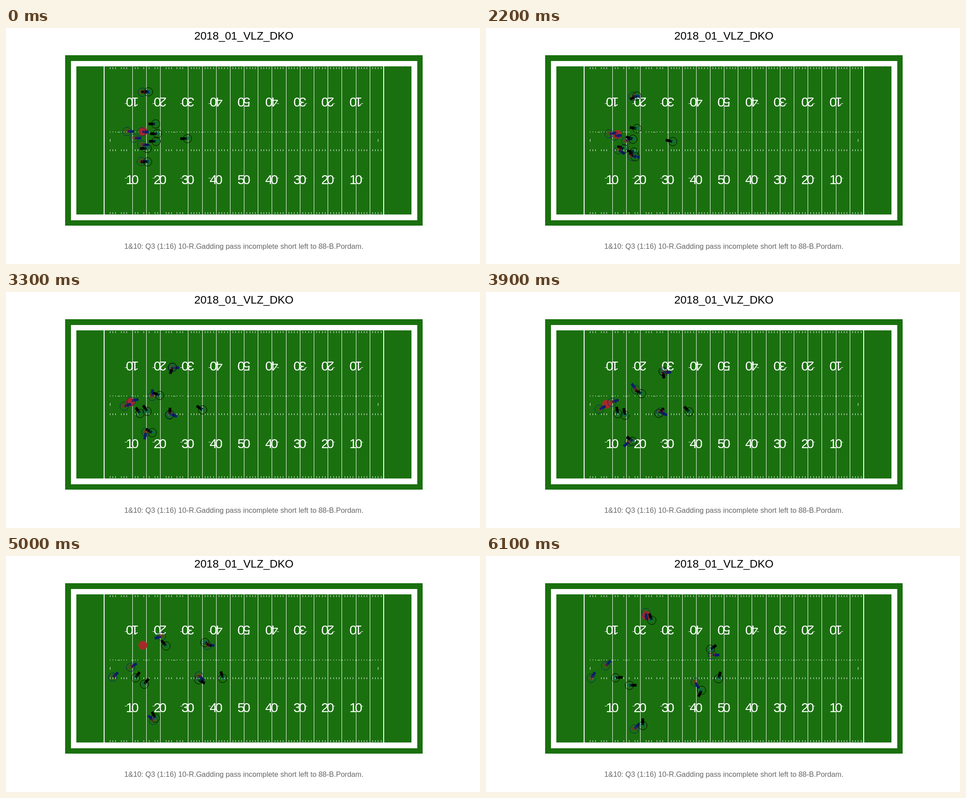
Recreate the animation shown at these times as an HTML page with a canvas. Size 1058x529 px, loop 6.2 s.

```html
<!DOCTYPE html>
<html lang="en">
<head>
<meta charset="utf-8">
<title>Play animation</title>
<style>
  html, body { margin: 0; width: 100%; height: 100%; overflow: hidden; background: #fff; }
  canvas { position: absolute; left: 0; top: 0; }
  p { position: absolute; left: 2px; width: 1058px; margin: 0; text-align: center;
      white-space: nowrap; font-family: "Liberation Sans", Arial, sans-serif; }
  .title { top: 2px; font-size: 24.6px; line-height: 31px; color: #000; }
  .note { top: 479px; font-size: 16.3px; line-height: 20px; color: #666; }
</style>
</head>
<body>
<canvas id="stage" width="1058" height="529"></canvas>
<p class="title">2018_01_VLZ_DKO</p>
<p class="note">1&amp;10: Q3 (1:16) 10-R.Gadding pass incomplete short left to 88-B.Pordam.</p>
<script>
const ctx = document.getElementById('stage').getContext('2d');
const FONT = '"Liberation Sans", Arial, sans-serif';
const GREEN = '#1a700e';
const LOOP = 6200, STEP = 100;
const SNAP = 1300, THROW = 4500, END = 6100;
const OFFENSE = { color: '#0b1f6b', text: '#a71930', facing: 0 };
const DEFENSE = { color: '#000', text: '#006778', facing: 180 };

// Each route runs from a start through a break to an end, turning to a final facing.
const players = [];
const player = (team, number, start, turn, end, facing) =>
  players.push({ team, number, start, turn, end, facing });

player(OFFENSE, '13', [304, 144], [407, 184], [505, 222], 0);
player(OFFENSE, '88', [303, 262], [337, 212], [357, 127], -275);
player(OFFENSE, '87', [302, 299], [398, 268], [467, 283], 60);
player(OFFENSE, '46', [286, 247], [322, 343], [331, 388], 312);
player(OFFENSE, '26', [270, 232], [281, 248], [267, 246], -45);
player(OFFENSE, '10', [303, 233], [249, 265], [235, 274], -58);

player(DEFENSE, '42', [334, 215], [349, 225], [370, 144], 250);
player(DEFENSE, '20', [318, 143], [404, 181], [501, 209], -35);
player(DEFENSE, '93', [315, 270], [293, 273], [289, 273], 355);
player(DEFENSE, '51', [338, 237], [309, 279], [320, 290], 358);
player(DEFENSE, '21', [316, 300], [394, 272], [481, 301], 475);
player(DEFENSE, '50', [335, 254], [327, 341], [350, 380], 270);
player(DEFENSE, '36', [405, 248], [459, 270], [519, 275], 285);

const ballPath = { start: [306, 232], release: [261, 256], end: [358, 134] };

// Yards to pixels, snapped to whole pixels.
const px = yard => Math.floor(219.85 + yard * 6.235);
const py = yard => Math.floor(418.6 - yard * 6.227);

const progress = (t, from, to) => Math.min(1, Math.max(0, (t - from) / (to - from)));
const mix = (a, b, u) => a + (b - a) * u;

// Parabola through start, turn and end.
const along = ({ start, turn, end }, u) => start.map((p, i) =>
  p * (1 - u) * (1 - 2 * u) + turn[i] * 4 * u * (1 - u) + end[i] * u * (2 * u - 1));

function ballAt(t) {
  const { start, release, end } = ballPath;
  const carry = progress(t, SNAP, THROW);
  const flight = 1 - (1 - progress(t, THROW, END)) ** 1.64;
  return start.map((p, i) => mix(mix(p, release[i], carry), end[i], flight));
}

function fieldRect(color, margin) {
  const x = px(-margin - 10), y = py(53.33 + margin);
  ctx.fillStyle = color;
  ctx.fillRect(x, y, px(110 + margin) - x, py(-margin) - y);
}

function circle(x, y, r) {
  ctx.beginPath();
  ctx.arc(x, y, r, 0, 2 * Math.PI);
}

function yardNumber(yard) {
  const x = px(yard), label = String(Math.min(yard, 100 - yard));
  ctx.font = '30px ' + FONT;
  ctx.textBaseline = 'alphabetic';
  for (const [y, turn] of [[339, 0], [166, Math.PI]]) {
    ctx.save();
    ctx.translate(x, y);
    ctx.rotate(turn);
    ctx.fillText(label[0], -6.2, 10.5);
    ctx.fillText(label[1], 6.2, 10.5);
    ctx.restore();
    const dash = yard < 50 ? x - 17 : x + 11;
    if (yard !== 50) ctx.fillRect(dash, turn ? 169 : 336, 5, 1);
  }
}

function drawField() {
  ctx.fillStyle = '#fff';
  ctx.fillRect(0, 0, 1058, 529);
  fieldRect(GREEN, 4);
  fieldRect('#fff', 2);
  fieldRect(GREEN, 0);

  ctx.fillStyle = '#fff';
  const top = py(53.33), height = py(0) - top;
  for (const goal of [0, 100]) ctx.fillRect(px(goal) - 1, top, 2, height);
  for (let yard = 1; yard < 100; yard++) {
    const x = px(yard);
    const hidden = yard % 4 === 1 && yard < 30;
    if (yard % 5 === 0) {
      if (!hidden) ctx.fillRect(x, top, 1, height);
      ctx.fillRect(x - 2, 233, 5, 1);
    } else if (!hidden) {
      for (const y of [88, 272, 413]) ctx.fillRect(x, y, 1, 4);
      ctx.fillRect(x, 232, 1, 2);
    }
  }
  for (const yard of [2, 98]) ctx.fillRect(px(yard), 249, 1, 6);
  for (let yard = 10; yard < 100; yard += 10) yardNumber(yard);
}

function drawPlayers(t) {
  const u = progress(t, SNAP, END) ** 1.3;
  const poses = players.map(p => ({ ...p, at: along(p, u) }));
  for (const { team, at: [x, y], facing } of poses) {
    ctx.strokeStyle = ctx.fillStyle = team.color;
    circle(x, y, 9.5);
    ctx.stroke();
    ctx.save();
    ctx.translate(x, y);
    ctx.rotate(mix(team.facing, facing, u) * Math.PI / 180);
    ctx.fillRect(1, -3, 15, 6);
    ctx.restore();
  }
  ctx.font = '11px ' + FONT;
  ctx.textBaseline = 'middle';
  for (const { team, number, at: [x, y] } of poses) {
    ctx.fillStyle = team.text;
    ctx.fillText(number, x, y);
  }
}

function draw(now) {
  const t = Math.floor(now % LOOP / STEP) * STEP;
  drawField();
  ctx.fillStyle = '#a52a2a';
  circle(...ballAt(t), 10);
  ctx.fill();
  drawPlayers(t);
  requestAnimationFrame(draw);
}

ctx.textAlign = 'center';
requestAnimationFrame(draw);
</script>
</body>
</html>
```
